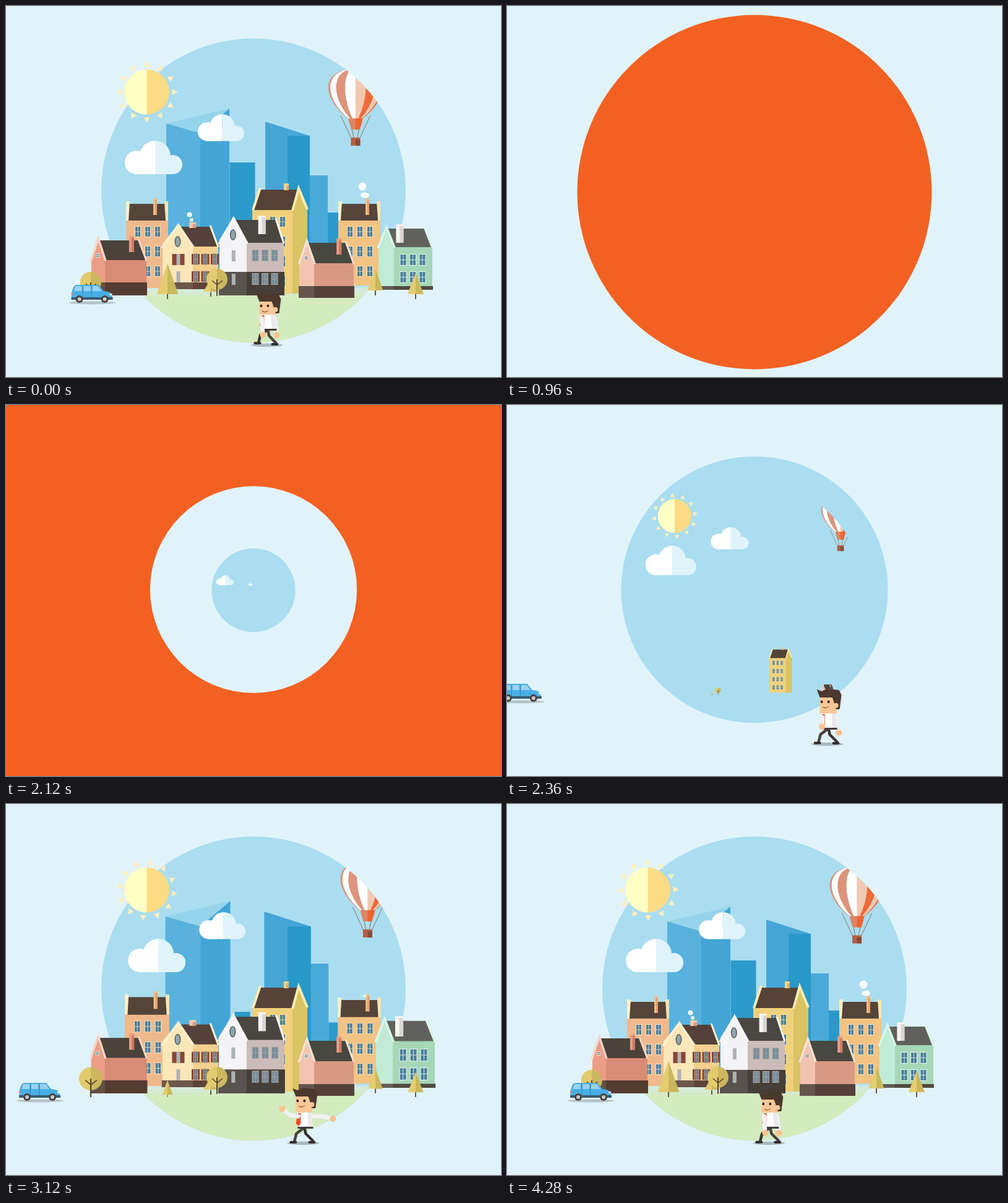
An HTML page with a canvas that plays this animation: 800 px wide and 600 px high, repeating every 4.32 s.

```html
<!DOCTYPE html>
<html lang="en">
<head>
<meta charset="utf-8">
<title>Little town</title>
<style>
html, body { margin: 0; width: 100%; height: 100%; overflow: hidden; background: #e1f3fa; }
canvas { display: block; width: 800px; height: 600px; }
</style>
</head>
<body>
<canvas id="stage" width="800" height="600"></canvas>
<script>
const c = document.getElementById('stage').getContext('2d');
const LOOP = 4320, PALE = '#e1f3fa', ORANGE = '#f26122', SKY = '#aaddf0';
const TAU = Math.PI * 2;
let now = 0, since = 0; // since: time from the moment the town is open

const clamp = v => Math.max(0, Math.min(1, v));
const outCubic = p => 1 - (1 - clamp(p)) ** 3;
function outBack(p) {
  const q = clamp(p) - 1;
  return p <= 0 ? 0 : 1 + 2.7 * q ** 3 + 1.7 * q * q;
}

function rect(color, x, y, w, h) { c.fillStyle = color; c.fillRect(x, y, w, h); }
function trace(p) {
  c.beginPath();
  for (let i = 0; i < p.length; i += 2) c.lineTo(p[i], p[i + 1]);
}
function poly(color, ...p) { trace(p); c.fillStyle = color; c.fill(); }
function line(color, width, ...p) {
  trace(p);
  c.strokeStyle = color; c.lineWidth = width; c.stroke();
}
function oval(color, x, y, rx, ry = rx) {
  c.beginPath(); c.ellipse(x, y, rx, ry, 0, 0, TAU);
  c.fillStyle = color; c.fill();
}
function twoTone(left, right, x, y, r) {
  oval(right, x, y, r);
  c.beginPath(); c.arc(x, y, r, TAU / 4, TAU * .75);
  c.fillStyle = left; c.fill();
}
// Runs draw with the origin moved to x, y
function at(x, y, s, draw) {
  if (s <= 0) return;
  c.save();
  c.translate(x, y); c.scale(s, s);
  draw();
  c.restore();
}
const pop = (start, x, y, draw) => at(x, y, outBack((now - start) / 800), draw);
function spread(start, draw) {
  at(400, 300, outCubic((now - start) / 600), () => at(-400, -300, 1, draw));
}
function skyClip() {
  c.beginPath(); c.arc(400, 298.5, 246, 0, TAU); c.clip();
}

function pane(x, y, w, h, glass, frame) {
  rect(frame, x - 1, y - 1, w + 2, h + 2);
  rect(glass, x, y, w, h);
  rect(frame, x + w / 2 - .4, y, .8, h);
  rect(frame, x, y + h / 2 - .4, w, .8);
}
function chimney(x, y, w, h, light, dark) {
  rect(light, x, y, w, h);
  rect(dark, x + w / 2, y + 3, w / 2, h - 3);
}

// One block with its foot at the middle of the base line
function block(start, x, w, h, color) {
  pop(start, x, 470, () => rect(color, -w / 2, -h, w, h));
}
function towers() {
  block(2988, 382, 41, 217, '#2c9aca');
  pop(2800, 310, 470, () => {
    poly('#95d4ea', -51, -280, 51, -304, 4, -263);
    poly('#58b2dd', -51, -280, 4, -264, 4, 0, -51, 0);
    poly('#42a5d6', 4, -264, 51, -304, 51, 0, 4, 0);
  });
  block(2904, 529, 18, 136, '#2b9acb');
  block(2736, 505, 30, 196, '#49aada');
  pop(2784, 455, 470, () => {
    poly('#45a6d6', -36, -283, 36, -260, 36, 0, -36, 0);
    rect('#2899c8', 0, -260, 36, 260);
  });
}

// Low house: gable on the left, long roof and wall on the right
function house(o) {
  const { w, h, gable: g, eave: e, foot, rows = 1, glass = '#477d9c', frame = '#f3e7dc' } = o;
  const peak = g * .53, end = w - 14, mid = (g + w) / 2;
  const smoke = o.chimney;
  pop(o.start, o.x + w / 2, o.y, () => {
    c.translate(-w / 2, 0);
    rect(o.wall, g - 1, -e - 4, w - g, e + 4);
    poly(o.face, 1, -e - 5, peak, -h, g, -e, g, 0, 1, 0);
    poly(o.roof, peak + 1, 4 - h, end, 4 - h, w - 1, -e, g, -e);
    line(o.edge, 3.5, 0, 2 - e, peak, 1 - h, g + 1, 1 - e);
    line(o.edge, 3, end, 2 - h, w - 1, 1 - e);
    rect(o.base, 0, -foot, w, foot);
    rect('rgba(255,255,255,.1)', 0, -foot, g, foot);
    chimney(w * smoke.at, -h - 3, smoke.w, smoke.h, smoke.light, smoke.dark);

    for (let r = 0; r < rows; r++) {
      const y = 12 - e + r * o.step;
      for (let i = -1; i <= 1; i++) {
        const x = mid + i * 15.5 - 5.5;
        if (o.shutter) rect(o.shutter, x - 2, y, 13, 17);
        pane(o.shutter ? x + 2 : x, y, o.shutter ? 5 : 9, 17, glass, frame);
      }
      if (!o.attic) continue;
      if (o.shutter && !r) rect(o.shutter, peak - 10, y, 20, 18);
      rect('#aeb3b4', peak - 3, y, 6, 18);
    }
    if (o.attic === 'round') {
      oval('#5a5d5c', peak - 1, 28 - h, 5, 9);
      oval('#8fa6af', peak - 1, 28 - h, 3.5, 7.5);
    } else if (o.attic) {
      pane(peak - 3, 26 - h, 4, 5, glass, frame);
    }
  });
}

// Town house with its roof sloping to the viewer
function rowHouse(start, x, y, h, wall) {
  pop(start, x, y, () => {
    rect(wall, -34, 30 - h, 68, h - 30);
    rect('#54443a', -30, 4 - h, 60, 27);
    poly('#fff0c6', -34, -h, -28, -h, -30, 31 - h, -34, 31 - h);
    poly('#fbe4ad', 28, -h, 34, -h, 34, 31 - h, 30, 31 - h);
    chimney(10, -h - 5, 6, 27, '#f2bd7c', '#e8a070');
    for (let r = 0; r < 3; r++)
      for (let i = 0; i < 3; i++) pane(-19 + i * 16, 41 - h + r * 32, 8, 16, '#477d9c', '#f6e2c0');
  });
}

function tallHouse() {
  pop(2280, 442, 465, () => {
    rect('#f0d07b', -44, -137, 66, 137);
    poly('#d9c363', 21, -135, 31, -171, 45, -137, 45, 0, 21, 0);
    poly('#564337', -31, -168, 30, -168, 20, -135, -43, -135);
    line('#fcecb2', 4, -43, -135, -31, -171);
    line('#fcecb2', 4, 21, -134, 31, -170, 45, -136);
    chimney(7, -178, 8, 11, '#f3d488', '#e0ac68');
    for (let r = 0; r < 4; r++)
      for (let i = 0; i < 3; i++) pane(-31 + i * 16, -124 + r * 32, 8, 16, '#477d9c', '#f6e2a8');
  });
}

function pine(start, x, y, h, w) {
  pop(start, x, y, () => {
    rect('#6b5339', -1, -h / 4, 2, h / 4);
    poly('#e4cd70', 0, -h, 0, -8, -w / 2, -8);
    poly('#cbb85c', 0, -h, w / 2, -8, 0, -8);
  });
}
function roundTree(start, x, y) {
  pop(start, x, y, () => {
    twoTone('#e2cb6e', '#cbb85e', 0, -27, 17);
    line('#5a4632', 2, 0, -27, 0, 0);
    line('#5a4632', 1.5, -8, -25, 0, -18, 9, -25);
  });
}

function town() {
  const clay = { w: 8, h: 26, light: '#e79e86', dark: '#cf7b65' };
  const stone = { w: 12, h: 30, light: '#f6f4f3', dark: '#dad6d4' };
  rowHouse(2504, 228, 456, 140, '#f0b98c');
  rowHouse(2424, 571, 452, 136, '#f2c383');
  tallHouse();
  house({
    start: 2360, x: 252, y: 458, w: 92, h: 105, gable: 50, eave: 69, foot: 11,
    rows: 2, step: 28, attic: 'round', shutter: '#8a4535', glass: '#5b7681', frame: '#c9a890',
    wall: '#f3d08e', face: '#fde7b8', roof: '#54423a', edge: '#fff1d0', base: '#5f4438',
    chimney: { w: 11, h: 9, light: '#f5cba8', dark: '#dc9b83', at: .48 }
  });
  house({
    start: 2602, x: 601, y: 459, w: 89, h: 103, gable: 26, eave: 69, foot: 6,
    rows: 2, step: 28, frame: '#eaf7ee',
    wall: '#a6d7b7', face: '#c0ebd5', roof: '#60615d', edge: '#d9f6e7', base: '#4f4a40',
    chimney: { ...stone, at: .33 }
  });
  house({
    start: 2384, x: 137, y: 468, w: 91, h: 93, gable: 23, eave: 57, foot: 21, attic: 'square',
    wall: '#d98c75', face: '#ec9d86', roof: '#4b433b', edge: '#f6d6c8', base: '#543c32',
    chimney: { ...clay, at: .68 }
  });
  house({
    start: 2410, x: 344, y: 468, w: 106, h: 126, gable: 45, eave: 85, foot: 38,
    rows: 2, step: 38, attic: 'round', glass: '#758d99', frame: '#b0a6a4',
    wall: '#cbbcb9', face: '#f4f3f5', roof: '#4a4642', edge: '#f8f7f8', base: '#463f39',
    chimney: { ...stone, at: .6 }
  });
  house({
    start: 2320, x: 473, y: 472, w: 90, h: 93, gable: 25, eave: 56, foot: 19, attic: 'square',
    wall: '#d89a85', face: '#f2c4b0', roof: '#474840', edge: '#fbe1d4', base: '#54423a',
    chimney: { ...clay, at: .68 }
  });
  roundTree(2680, 137, 474);
  pine(3024, 261, 474, 58, 35);
  pine(2330, 331, 470, 29, 24);
  roundTree(2310, 341, 469);
  pine(2860, 597, 468, 43, 25);
  pine(2850, 662, 474, 42, 26);
}

function puff(start, x, y, rx, ry = rx) {
  const s = outCubic((now - start) / 700);
  at(x + 3 * (1 - s), y + 10 * (1 - s), s, () => oval('rgba(255,255,255,.9)', 0, 0, rx, ry));
}
function smoke() {
  puff(2960, 300, 346, 3);
  puff(3300, 296.5, 337.5, 4);
  puff(2960, 580, 306, 7, 4.5);
  puff(3300, 576, 292, 6.5);
}

function sun() {
  at(227.5, 139, 1, () => {
    twoTone('#ffffc6', '#fbdb84', 0, 0, 36.5);
    c.rotate(since / 1600 * TAU / 12);
    for (let i = 0; i < 12; i++) {
      poly('#ffeeb9', 0, -50, -5, -41, 5, -41);
      c.rotate(TAU / 12);
    }
  });
}

function cloud(x, y, s) {
  at(x, y, s, () => {
    for (const [color, left] of [['#fff', 0], [PALE, 49]]) {
      c.save();
      c.beginPath(); c.rect(left, -1, 49, 57); c.clip();
      oval(color, 19, 35, 19);
      oval(color, 49, 25, 25);
      oval(color, 77.5, 38.5, 15.5);
      rect(color, 19, 30, 58, 24);
      c.restore();
    }
  });
}

function balloon() {
  c.save();
  skyClip();
  c.translate(591 - .0163 * since, 131.5 + .0083 * since);
  for (const k of [-1, -.4, .4, 1]) line('#8c7465', 1, k * 24, 32, k * 7, 69);
  // Vertical stripes between seams; k is the seam's place from -1 to 1
  const seam = i => Math.sin((i / 8 - .5) * Math.PI);
  for (let i = 0; i < 8; i++) {
    const a = seam(i), b = seam(i + 1), shade = i > 3;
    c.beginPath();
    c.moveTo(0, -43);
    c.bezierCurveTo(a * 59, -43, a * 54, 5, a * 12, 37);
    c.lineTo(b * 12, 37);
    c.bezierCurveTo(b * 54, 5, b * 59, -43, 0, -43);
    c.fillStyle = i % 2 ? (shade ? '#ee6a39' : '#fff') : (shade ? '#f2c8b1' : '#dd947a');
    c.fill();
  }
  poly('#dd8465', -12, 37, 12, 37, 7, 55, -7, 55);
  poly('#ef652f', 0, 37, 12, 37, 7, 55, 0, 55);
  rect('#b55f45', -7.5, 68, 15, 13);
  rect('#8c4a36', 0, 71, 7.5, 10);
  c.restore();
}

function car() {
  at(2 + .0418 * since + 1.43e-5 * since ** 2, 450, 1, () => {
    oval('#b5c4ca', 34, 30, 38, 2.5);
    c.beginPath();
    c.moveTo(0, 25); c.lineTo(1, 12);
    c.quadraticCurveTo(3, 2, 8, 1);
    c.lineTo(44, 1); c.lineTo(52, 11);
    c.quadraticCurveTo(65, 12, 66, 18);
    c.lineTo(66, 25);
    c.fillStyle = '#49aee6'; c.fill();
    poly('#98d2ef', 4, 11, 7, 3, 43, 3, 49, 11);
    for (const x of [17, 31]) {
      rect('#49aee6', x, 3, 3, 8);
      rect('#2f89bd', x + 1, 3, 1, 18);
    }
    rect('#365a70', 0, 21, 67, 4);
    rect('#e8f6fc', 62, 15, 4, 3);
    rect('#e98a60', 0, 13, 2, 5);
    for (const x of [13, 54]) {
      oval('#4b423d', x, 24, 6);
      oval('#c6ccce', x, 24, 3);
    }
  });
}

function leg(phase, color) {
  const x = 1 - 15 * Math.cos(phase), lift = 5 * Math.max(0, Math.sin(phase));
  line(color, 4.5, 2, 523, x / 2 - 4, 533 - lift / 3, x, 545 - lift);
  line('#332e2b', 4, x - 6, 547 - lift, x + 2, 547 - lift);
}
function arm(sx, x, y, sag) {
  line('#f2eff1', 7, sx, 505, (sx + x) / 2, (505 + y) / 2 + sag, x, y);
  oval('#fac28e', x, y, 5);
}
function man() {
  const u = now - 3120, step = u / 770 * TAU;
  const open = Math.max(0, Math.cos(clamp(Math.abs(u) / 1200) * TAU / 4)) ** 4;
  at(500 - .0491 * since, 0, 1, () => {
    c.lineJoin = c.lineCap = 'round';
    oval('#a9b9bf', 0, 548.5, 26, 2.8);
    arm(13, 16 + 32 * open, 532 - 23 * open, -2);
    leg(step + Math.PI, '#39332f');
    leg(step, '#4a423c');
    poly('#fff', -10, 499, 13, 499, 16, 523, -9, 523);
    poly('#ebe8ed', 7, 499, 13, 499, 16, 523, 8, 523);
    rect('#413a36', -9, 522, 25, 3);
    poly('#f04e23', -8, 500, -4, 500, -4, 517, -8, 521, -12, 516);
    arm(-8, -6 - 28 * open, 532 - 39 * Math.sqrt(open), 4);

    const bob = 5 * clamp(u / 1100);
    c.translate(0, bob);
    rect('#fac796', -12, 468, 27, 31 - bob);
    poly('#4b382e', -17, 460, -9, 463, 0, 459, 19, 461, 23, 469, 20, 492, 14, 492, 10, 478, 8, 473, -12, 473);
    oval('#fac796', 14, 486, 4);
    for (const x of [-9, 2]) oval('#3a2c26', x, 480, 2, 2.3);
    line('#a85d3e', 1.3, -7, 489, -2, 490, 2, 488);
  });
}

function ground() {
  const p = clamp((now - 2400) / 640);
  if (!p) return;
  c.save();
  skyClip();
  c.globalAlpha = clamp(p * 2.5);
  const g = c.createLinearGradient(0, 452, 0, 530 - 58 * p);
  g.addColorStop(0, SKY);
  g.addColorStop(.3, p < 1 ? '#b0dfe9' : '#d5ebdf');
  g.addColorStop(1, '#d4ebbe');
  rect(g, 150, 452, 500, 100);
  c.restore();
}

function scene() {
  rect(PALE, 0, 0, 800, 600);
  spread(2060, () => oval(SKY, 400, 298.5, 246));
  spread(2140, sun);
  towers();
  ground();
  spread(2160, balloon);
  spread(2053, () => cloud(199 - .0044 * since, 218, 1));
  spread(2101, () => cloud(313 - .0019 * since, 175, .806));
  smoke();
  town();
  if (now > 2300) { car(); man(); }
}

function iris(r) {
  rect(ORANGE, 0, 0, 800, 600);
  if (r <= 0) return;
  c.save();
  c.beginPath(); c.arc(400, 298.5, r, 0, TAU); c.clip();
  scene();
  c.restore();
}
function disc(r) {
  rect(PALE, 0, 0, 800, 600);
  if (r > 0) oval(ORANGE, 400, 301, r);
}

function draw(t) {
  now = t < 1000 ? t + LOOP : t;
  since = now - 2720;
  if (t < 820) iris(512 * (1 - t / 640));
  else if (t < 1360) disc(510 * Math.max(0, (1200 - t) / 400) ** 1.12);
  else if (t < 1925) disc(145 * ((t - 1360) / 360) ** 2.8);
  else if (t < 2440) iris(166 * ((t - 1920) / 200) ** 1.4);
  else scene();
}

const begin = performance.now();
function tick() {
  draw((performance.now() - begin) % LOOP);
  requestAnimationFrame(tick);
}
tick();
</script>
</body>
</html>
```
